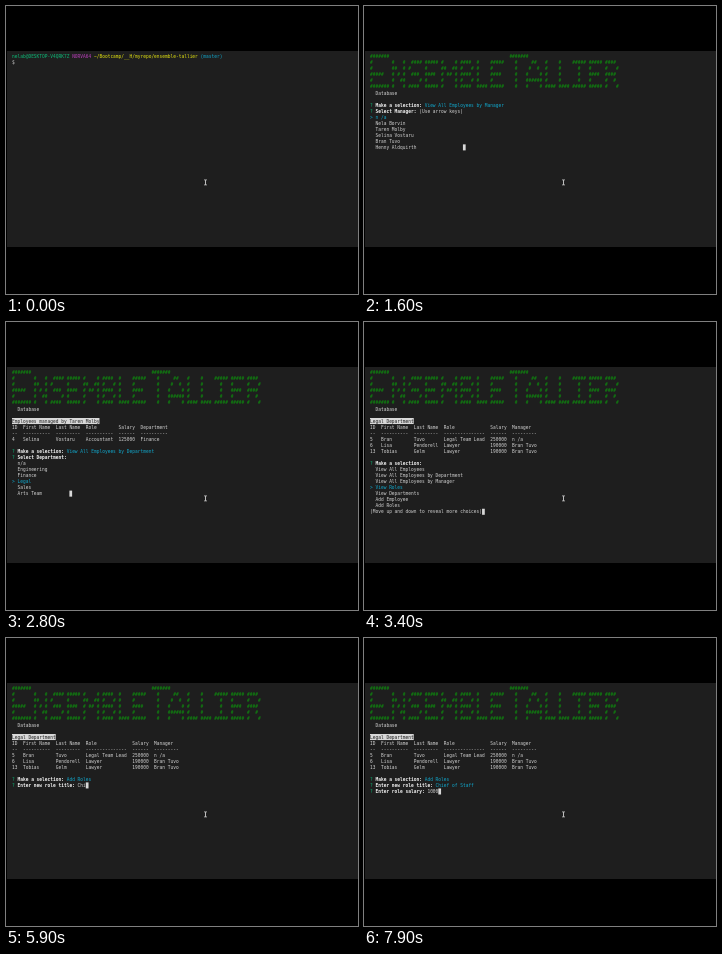
An HTML page with a canvas that plays this animation: 352 px wide and 288 px high, repeating every 8000 ms.

```html
<!DOCTYPE html>
<html lang="en">
<head>
<meta charset="utf-8">
<title>Terminal session</title>
<style>
html, body { margin: 0; width: 100%; height: 100%; overflow: hidden; background: #000; }
canvas { display: block; width: 352px; height: 288px; }
</style>
</head>
<body>
<canvas id="stage" width="352" height="288"></canvas>
<script>
const ctx = document.getElementById('stage').getContext('2d');
const LOOP = 8000;
const LEFT = 6, TOP = 47.6, CELL = 2.733, LINE = 6.05;
const FONT = '45.4px "DejaVu Sans Mono", "Liberation Mono", monospace';

const GREY = '#d2d2d2', WHITE = '#f4f4f4', CYAN = '#11a8cd', MINT = '#0dbc79',
      PINK = '#bc3fbc', YELLOW = '#e5e510', LEAF = '#0c960c', DARK = '#1e1e1e';

// Text is set at ten times its size and scaled down for even spacing.
function put(row, col, text, color = GREY, bold = false) {
  ctx.save();
  ctx.translate(LEFT + col * CELL, TOP + row * LINE + 4.6);
  ctx.scale(0.1, 0.1);
  ctx.font = (bold ? 'bold ' : '') + FONT;
  ctx.fillStyle = color;
  ctx.fillText(text, 0, 0);
  ctx.restore();
}

function block(row, col, cells = 1) {
  ctx.fillStyle = '#d8d8d8';
  ctx.fillRect(LEFT + col * CELL, TOP + row * LINE, cells * CELL, LINE);
}

function ask(row, question, answer = '', color = CYAN) {
  put(row, 0, '?', MINT);
  put(row, 2, question, WHITE, true);
  put(row, question.length + 3, answer, color);
}

// Banner lettering
const GLYPHS = {
  n: '#   #/##  #/# # #/#  ##/#   #',
  s: ' ####/#    / ### /    #/#### ',
  e: '#####/#    /#### /#    /#####',
  m: '#    #/##  ##/# ## #/#    #/#    #',
  b: '#### /#   #/#### /#   #/#### ',
  l: '#   /#   /#   /#   /####',
  a: '  ##  / #  # /#    #/######/#    #',
  i: '#####/  #  /  #  /  #  /#####',
  r: '#### /#   #/#### /#  # /#   #'
};

function letters(word, col) {
  for (const ch of word) {
    const rows = GLYPHS[ch].split('/');
    rows.forEach((r, i) => put(i + 1, col, r, LEAF));
    col += rows[0].length + 1;
  }
}

function banner() {
  const bar = '#######';
  [bar, '#', '#', '#####', '#', bar].forEach((r, i) => put(i, 0, r, LEAF));
  letters('nsemble', 8);
  put(0, 51, bar, LEAF);
  for (let i = 1; i < 6; i++) put(i, 53, '#', LEAF);
  letters('allier', 57);
  put(6, 2, 'Database');
}

// Lists
const MENU = ['View All Employees', 'View All Employees by Department',
  'View All Employees by Manager', 'View Roles', 'View Departments',
  'Add Employee', 'Add Roles', 'Add Departments', 'Update Employee Role',
  'Update Employee Manager'];
const MANAGERS = ['n /a', 'Nela Borvin', 'Taren Molby', 'Selina Vostaru',
  'Bran Tuvo', 'Henny Aldquirth'];
const TEAMS = ['n/a', 'Engineering', 'Finance', 'Legal', 'Sales', 'Arts Team'];
const HINT = '(Use arrow keys)';

function options(row, items, active) {
  items.forEach((item, i) => {
    if (i === active) put(row + i, 0, '> ' + item, CYAN);
    else put(row + i, 2, item);
  });
}

function menu(row, active) {
  const first = Math.max(0, active - 3);
  ask(row, 'Make a selection:', active ? '' : HINT, GREY);
  options(row + 1, MENU.slice(first, first + 7), active - first);
  put(row + 8, 0, '(Move up and down to reveal more choices)');
  block(row + 8, 41);
}

function picker(row, choice, question, items, active) {
  const hint = active ? '' : HINT;
  ask(row, 'Make a selection:', choice);
  ask(row + 1, question, hint, GREY);
  options(row + 2, items, active);
  block(row + 1 + items.length, question.length + 3 + hint.length);
}

// Tables
function table(title, cols, widths, rows) {
  block(8, 0, title.length);
  put(8, 0, title, DARK);
  const rule = widths.map(w => '-'.repeat(w));
  [cols, rule, ...rows].forEach((cells, i) =>
    put(9 + i, 0, cells.map((c, k) => c.padEnd(widths[k])).join('  ')));
}

function managed() {
  table('Employees managed by Taren Molby',
    ['ID', 'First Name', 'Last Name', 'Role', 'Salary', 'Department'],
    [2, 10, 9, 10, 6, 10],
    [['4', 'Selina', 'Vostaru', 'Accountant', '125000', 'Finance']]);
}

function legal() {
  table('Legal Department',
    ['ID', 'First Name', 'Last Name', 'Role', 'Salary', 'Manager'],
    [2, 10, 9, 15, 6, 9],
    [['5', 'Bran', 'Tuvo', 'Legal Team Lead', '250000', 'n /a'],
     ['6', 'Lisa', 'Pendorell', 'Lawyer', '190000', 'Bran Tuvo'],
     ['13', 'Tobias', 'Gelm', 'Lawyer', '190000', 'Bran Tuvo']]);
}

// Value of the last [time, value] pair that has been reached
function at(t, steps) {
  let value = steps[0][1];
  for (const [time, v] of steps) if (t >= time) value = v;
  return value;
}

const tick = (t, start) => Math.floor((t - start) / 100);

function shell(t) {
  put(0, 0, 'nelab@DESKTOP-V4QRK7Z', MINT);
  put(0, 22, 'NORVA64', PINK);
  put(0, 30, '~/Bootcamp/__H/myrepo/ensemble-tallier', YELLOW);
  put(0, 69, '(master)', CYAN);
  put(1, 0, '$');
  if (t >= 300) {
    const n = Math.min(9, Math.ceil((tick(t, 300) + 1) * 1.5));
    put(1, 2, 'run start'.slice(0, n));
    block(1, 2 + n);
  }
}

const TITLE = 'Chief of Staff';

function newRole(t) {
  ask(15, 'Make a selection:', 'Add Roles');
  const label = 'Enter new role title:';
  if (t < 6800) {
    const draft = at(t, [[0, 0], [4600, 1], [4700, 2], [4800, 3], [4900, 4],
      [5000, 5], [5100, 3], [5200, 2], [5300, 1], [5400, 0]]);
    const typed = at(t, [[0, 0], [5600, 1], [5800, 2], [5900, 3], [6000, 4],
      [6100, 5], [6200, 6], [6300, 8], [6500, 10], [6600, 12], [6700, 14]]);
    const text = 'Manag'.slice(0, draft) + TITLE.slice(0, typed);
    ask(16, label, text, GREY);
    block(16, 24 + text.length);
  } else {
    const n = at(t, [[0, 0], [7400, 1], [7600, 2], [7700, 3], [7900, 4]]);
    ask(16, label, TITLE);
    ask(17, 'Enter role salary:', '1000'.slice(0, n), GREY);
    block(17, 21 + n);
  }
}

function screen(t) {
  if (t < 1000) return shell(t);
  banner();
  if (t < 1500) {
    menu(8, at(t, [[0, 0], [1200, 1], [1300, 2]]));
  } else if (t < 1900) {
    picker(8, MENU[2], 'Select Manager:', MANAGERS, at(t, [[0, 0], [1700, 1], [1800, 2]]));
  } else if (t < 3000) {
    managed();
    if (t < 2300) menu(13, t < 2200 ? 0 : 1);
    else picker(13, MENU[1], 'Select Department:', TEAMS,
      at(t, [[0, 0], [2500, 1], [2700, 2], [2800, 3]]));
  } else {
    legal();
    if (t < 3800) menu(15, Math.max(0, tick(t, 3100)));
    else newRole(t);
  }
}

function pointer() {
  ctx.fillStyle = '#bdbdbd';
  ctx.fillRect(199, 174, 1, 5);
  ctx.fillRect(198, 173.5, 3, 0.8);
  ctx.fillRect(198, 178.5, 3, 0.8);
}

function draw(now) {
  ctx.fillStyle = '#000';
  ctx.fillRect(0, 0, 352, 288);
  ctx.fillStyle = DARK;
  ctx.fillRect(1, 45, 351, 196);
  screen(now % LOOP);
  pointer();
}

let start = null;
function frame(now) {
  if (start === null) start = now;
  draw(Math.max(0, now - start));
  requestAnimationFrame(frame);
}
draw(0);
requestAnimationFrame(frame);
</script>
</body>
</html>
```
